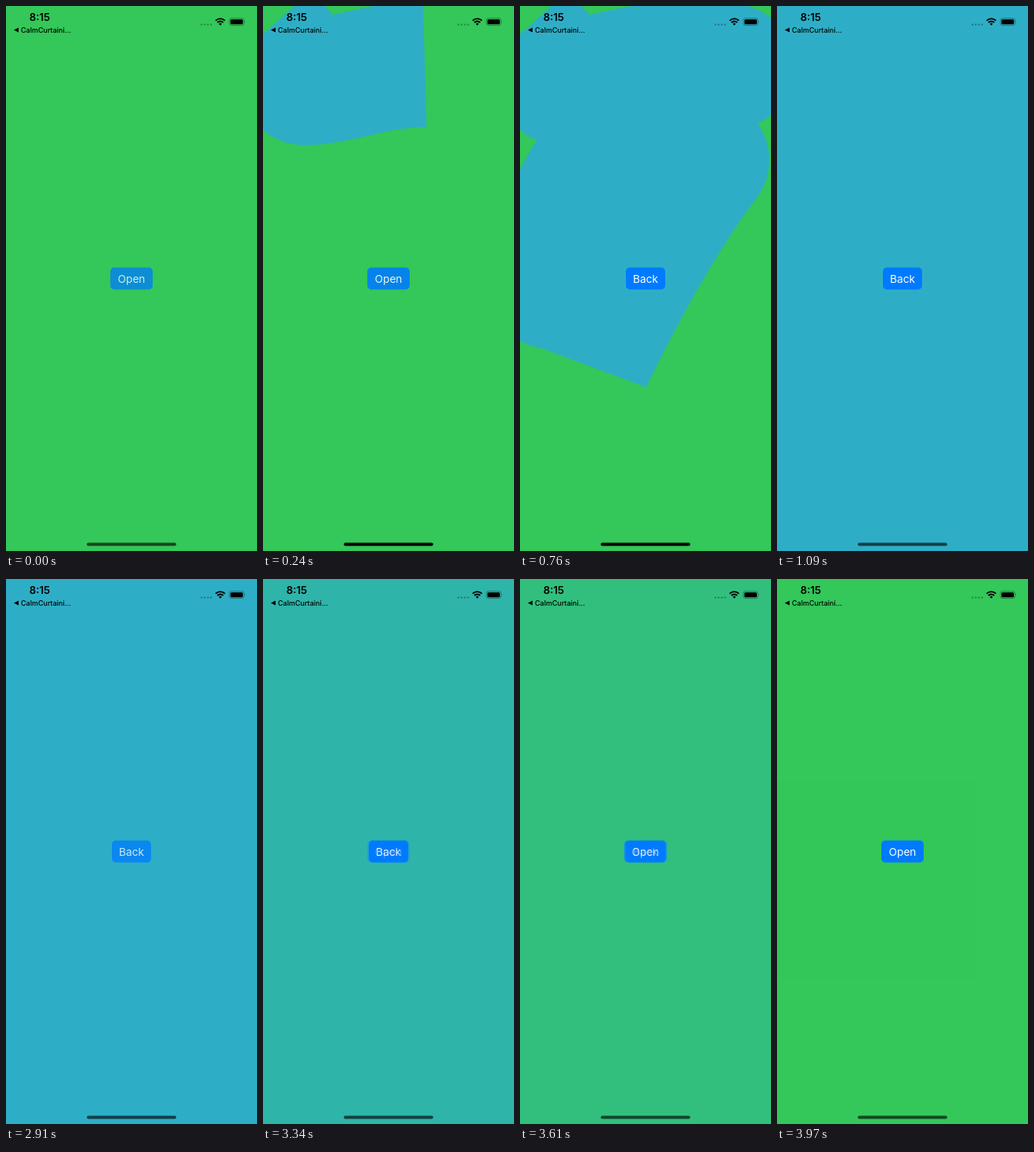
Recreate the animation shown at these times as an HTML page. Size 320 by 693 pixels, loop 4 s.

```html
<!DOCTYPE html>
<html lang="en">
<head>
<meta charset="utf-8">
<title>Brush reveal transition</title>
<style>
  html, body { margin: 0; width: 100%; height: 100%; overflow: hidden; background: #34c759; }
  svg { display: block; width: 100%; height: 100%; }
  text { font-family: Inter, "Liberation Sans", sans-serif; }
  .label { font-size: 13.7px; fill: #fff; text-anchor: middle; }
</style>
</head>
<body>
<svg viewBox="0 0 320 693">
  <defs>
    <mask id="brush" maskUnits="userSpaceOnUse" x="0" y="0" width="320" height="693">
      <path id="scribble" fill="none" stroke="#fff" stroke-width="160" stroke-linejoin="round"/>
    </mask>
  </defs>

  <rect width="320" height="693" fill="#34c759"/>
  <g id="openButton">
    <rect x="133" y="332.5" width="54" height="28" rx="5" fill="#007aff"/>
    <text class="label" x="160" y="352">Open</text>
  </g>

  <g id="backView">
    <rect width="320" height="693" fill="#2eaec6"/>
    <g id="backButton">
      <rect x="135" y="332.5" width="50" height="28" rx="5" fill="#007aff"/>
      <text class="label" x="160" y="352">Back</text>
    </g>
  </g>

  <g id="statusBar">
    <text x="43" y="19.3" font-size="13.3" font-weight="600" text-anchor="middle">8:15</text>
    <path d="M10 30.5 16 27.4V33.6Z"/>
    <text x="19" y="33.6" font-size="9" font-weight="500">CalmCurtaini...</text>
    <path d="M249.2 23.6h13" stroke="#000" stroke-opacity=".32" stroke-width="2.4"
          stroke-linecap="round" stroke-dasharray="0 4.1"/>
    <g fill="none" stroke="#000" stroke-width="1.9">
      <path d="M267.3 18.6a8.3 8.3 0 0 1 11.8 0M269.5 21a5.2 5.2 0 0 1 7.4 0"/>
      <path d="M271.3 22.8a2.7 2.7 0 0 1 3.8 0L273.2 24.8Z" fill="#000" stroke="none"/>
    </g>
    <rect x="284.9" y="15.6" width="18.4" height="9" rx="2.6" fill="none" stroke="#000" stroke-opacity=".4" stroke-width=".9"/>
    <rect x="286.2" y="16.9" width="15.8" height="6.4" rx="1.5"/>
    <path d="M304.3 18.6q1.2 1.5 0 3Z" fill-opacity=".45"/>
  </g>
  <rect id="homeBar" x="103" y="682.4" width="114" height="4.2" rx="2.1"/>
</svg>

<script>
const LOOP = 4000, STEP = 30, PHASE = 10;
const REVEAL_START = 90, REVEAL_END = 1090, HALF_WAY = 460;
const PRESS_BACK = 2910, FADE_START = 3000, FADE_TIME = 1000;
const PRESSED = 0.75, RELEASE_TIME = 250;

const [scribble, openButton, backView, backButton, homeBar] =
  ['scribble', 'openButton', 'backView', 'backButton', 'homeBar'].map(id => document.getElementById(id));

const upperStrokes = 'M115 40L52 97C110 97 160 62 269 77C175 113 58 191 39 356';
const lowerStrokes = 'Q146 282 238 196Q172 282 93 441Q70 492 60 580Q150 510 262 430L250 645';

// The brush moves at constant speed and turns the lower left corner at HALF_WAY.
scribble.setAttribute('d', upperStrokes);
const speed = (scribble.getTotalLength() + 1) / (HALF_WAY - REVEAL_START);
scribble.setAttribute('d', upperStrokes + lowerStrokes);

const clamp = v => Math.min(1, Math.max(0, v));
const easeInOut = v => (1 - Math.cos(Math.PI * clamp(v))) / 2;
const release = elapsed => PRESSED + (1 - PRESSED) * clamp(elapsed / RELEASE_TIME);

function draw(time) {
  const t = Math.max(0, Math.floor((time - PHASE) / STEP) * STEP + PHASE);
  const revealing = time >= REVEAL_START && time < REVEAL_END;
  const length = Math.max(0.01, speed * (t - REVEAL_START));

  scribble.setAttribute('stroke-dasharray', `${length} 9999`);
  if (revealing) backView.setAttribute('mask', 'url(#brush)');
  else backView.removeAttribute('mask');

  const fade = easeInOut((t - FADE_START) / FADE_TIME);
  backView.setAttribute('opacity', time < REVEAL_START ? 0 : 1 - fade);
  openButton.setAttribute('opacity', release(t - REVEAL_START));
  // The lower button stays solid for the second half, when only the upper one is pressed.
  if (time >= REVEAL_END) openButton.setAttribute('opacity', time < FADE_START ? 0 : 1);
  backButton.setAttribute('opacity', time < PRESS_BACK ? 1 : release(t - FADE_START));
  homeBar.setAttribute('opacity', revealing ? 1 : 0.64);
}

const start = performance.now();
function tick() {
  draw((performance.now() - start) % LOOP);
  requestAnimationFrame(tick);
}
tick();
</script>
</body>
</html>
```
